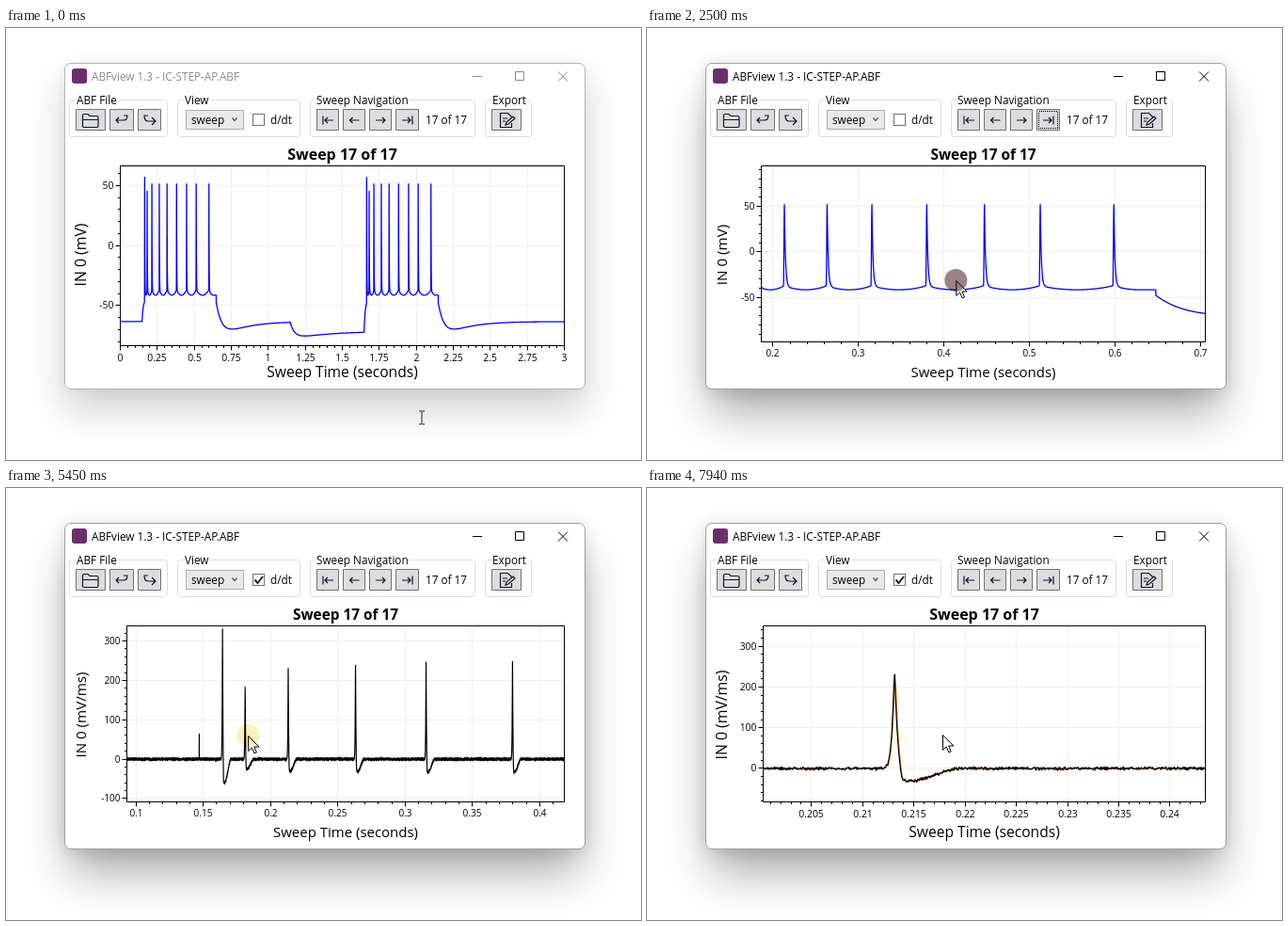
These frames come from a looping animation (675 by 459 pixels, 8 s). An HTML page with a canvas:

```html
<!DOCTYPE html>
<html lang="en">
<head>
<meta charset="utf-8">
<title>ABFview</title>
<style>
html, body { margin: 0; width: 675px; height: 459px; overflow: hidden; background: #fff; }
body { position: relative; }
body > * { position: absolute; left: 0; top: 0; }
#window {
  left: 62px; top: 37px; width: 552px; height: 345px; border-radius: 7px;
  background: #fff; border: 1px solid #b4b4b4;
  box-shadow: 0 21px 40px rgba(0,0,0,.19), 0 1px 10px rgba(0,0,0,.05);
}
.active #window {
  border-color: #a0a0a0;
  box-shadow: 0 30px 48px -6px rgba(0,0,0,.34), 0 2px 18px rgba(0,0,0,.12);
}
#chrome { font: 11.75px "Open Sans", "Noto Sans", sans-serif; fill: #000; }
.bar { fill: #8c8c8c; }
.controls { fill: none; stroke: #8a8a8a; }
.active .bar { fill: #000; }
.active .controls { stroke: #000; }
.group { fill: none; stroke: #d5dfe5; }
.legend { stroke: #fff; stroke-width: 5px; paint-order: stroke; }
.button { fill: #ddd; stroke: #707070; }
.icon { fill: none; stroke: #101430; stroke-width: 1.2; }
#focus { fill: none; stroke: #000; stroke-dasharray: 1 1; shape-rendering: crispEdges; visibility: hidden; }
.active #focus { visibility: visible; }
.derivative #focus { visibility: hidden; }
#check { visibility: hidden; fill: none; stroke: #212121; stroke-width: 2; }
.derivative #check { visibility: visible; }
#pointer { overflow: visible; width: 1px; height: 1px; }
#dot { width: 24px; height: 24px; margin: -12px; border-radius: 50%; mix-blend-mode: multiply; }
</style>
</head>
<body>
<div id="window"></div>
<svg id="chrome" width="675" height="459">
  <rect x="70" y="43" width="16" height="16" rx="3" fill="#6b2f6e"/>
  <text class="bar" x="91" y="56">ABFview 1.3 - IC-STEP-AP.ABF</text>
  <path class="controls" d="M496 51.5h10M541.5 46.5h9v9h-9zM587 46.5l10 10m0-10l-10 10"/>

  <g class="group">
    <rect x="67.5" y="76.5" width="104" height="39" rx="3"/>
    <rect x="182.5" y="76.5" width="130" height="39" rx="3"/>
    <rect x="323.5" y="76.5" width="175" height="39" rx="3"/>
    <rect x="509.5" y="76.5" width="49" height="39" rx="3"/>
  </g>
  <g class="legend">
    <text x="75" y="81">ABF File</text>
    <text x="190" y="81">View</text>
    <text x="330" y="81">Sweep Navigation</text>
    <text x="517" y="81">Export</text>
  </g>

  <path class="button" d="M74.5 86.5h31v22h-31zM110.5 86.5h25v22h-25zM140.5 86.5h24v22h-24z
    M330.5 86.5h23v22h-23zM358.5 86.5h23v22h-23zM386.5 86.5h23v22h-23zM414.5 86.5h24v22h-24z
    M516.5 86.5h31v22h-31z"/>
  <rect id="focus" x="416.5" y="88.5" width="20" height="18"/>
  <g class="icon">
    <path d="M81.5 105V93q0-1.500 1.500-1.500h4l2 2h7.500q1.500 0 1.500 1.500v9q0 1.500-1.500 1.500H83q-1.500 0-1.500-1.500M82 97.500h15.500"/>
    <path d="M120 95l-3 3 3 3M117 98h8q4 0 4-5h-4"/>
    <path d="M155 95l4 4-4 4M159 99h-8q-4 0-4-6h4"/>
    <path d="M337 93.500v9M348 98h-9m3-3l-3 3 3 3"/>
    <path d="M375.500 98h-10m3-3l-3 3 3 3"/>
    <path d="M393 98h10m-3-3l3 3-3 3"/>
    <path d="M432 93.500v9M421 98h9m-3-3l3 3-3 3"/>
    <path d="M537.500 101v4.500h-12v-15h8l4 4M528 96h5M528 99h3M531 103l1-3 7-6 2 2-7 6z"/>
  </g>

  <rect x="191.5" y="87.5" width="61" height="20" fill="#e9e9e9" stroke="#acacac"/>
  <text x="197" y="102">sweep</text>
  <path d="M240.500 95.500l2.500 3 2.500-3" fill="none" stroke="#555" stroke-width="1.2"/>
  <rect x="262.5" y="91.5" width="12" height="12" fill="#fff" stroke="#707070"/>
  <path id="check" d="M264.500 97.500l3 3.500 5.500-7"/>
  <text x="281" y="102">d/dt</text>
  <text x="446" y="102">17 of 17</text>
</svg>
<canvas id="plot" width="675" height="459"></canvas>
<svg id="pointer">
  <path id="arrow" d="M.5.5V16.500l3.700-3.600 2.600 6 2.400-1-2.600-5.900h5.200z" fill="#fff" stroke="#000"/>
  <path id="beam" d="M-3-7h2.500l.5.500.5-.5H3M0-6.500v13M-3 7h2.500l.5-.5.500.5H3" fill="none" stroke="#222"/>
</svg>
<div id="dot"></div>

<script>
const LOOP = 8000, TRAVEL = 400, ACTIVATE = 470;
const TOP = 146.5, RIGHT = 593.5, MIDDLE = 240, WIDTH = 472, HEIGHT = 187;
const RATE = 20000, COUNT = 3 * RATE + 1;
const FONT = '"Open Sans", "Noto Sans", sans-serif';
const $ = id => document.getElementById(id);
const ctx = $('plot').getContext('2d');

const gesture = (start, end, action, x, y, dx = 0, dy = 0) =>
  ({ start, end, action, x, y, dx, dy });

// The pointer travels between gestures; pan and zoom alone move the axes.
const gestures = [
  gesture(470, 850, 'pan', 200, 232, 165.8, 6.2),
  gesture(950, 1400, 'zoom', 332, 241, 252.3, 25.2),
  gesture(1810, 2090, 'zoom', 258, 266, 331.3),
  gesture(2490, 2850, 'zoom', 328, 268, 121.4),
  gesture(3320, 3330, 'hover', 407, 114),
  gesture(3660, 3870, 'check', 274, 98),
  gesture(4540, 4930, 'pan', 246, 242, 276.5, -6.5),
  gesture(5440, 5700, 'pan', 257, 263, 32.2, 7),
  gesture(5800, 5990, 'zoom', 290, 268, 298, 7.2),
  gesture(6250, 6610, 'zoom', 319, 275, 182),
  gesture(6900, 7100, 'zoom', 300, 264, 126.5, -10.3),
  gesture(7400, 7870, 'pan', 263, 261, 129.2, 1),
  gesture(7930, LOOP, 'hover', 314, 262)
];
const dotColor = { pan: '#ffeeb8', check: '#ffeeb8', zoom: '#9c8383' };

function smooth(a, b, v) {
  const k = Math.min(1, Math.max(0, (v - a) / (b - a)));
  return k * k * (3 - 2 * k);
}

const mix = (a, b, k) => a + (b - a) * k;
const zoomFactor = (d, size) => Math.pow(10, d / (Math.abs(d) + size));

const actions = {
  hover() {},
  pan(view, dx, dy) {
    view.center -= dx / WIDTH * view.span;
    view.zero += dy;
  },
  zoom(view, dx, dy) {
    const fy = zoomFactor(-dy, HEIGHT);
    view.span /= zoomFactor(dx, WIDTH);
    view.unit *= fy;
    view.zero = MIDDLE + (view.zero - MIDDLE) * fy;
  },
  check(view, dx, dy, done) {
    if (done) Object.assign(view, { derivative: true, zero: 294.5, unit: .418 });
  }
};

function poseAt(t) {
  const view = { center: 1.5, span: 3, zero: 231, unit: 1.275, derivative: false };
  let x = 442, y = 414, free = 70;
  for (const g of gestures) {
    if (t < g.start) {
      const k = smooth(free, Math.min(g.start, free + TRAVEL), t);
      return { view, x: mix(x, g.x, k), y: mix(y, g.y, k) };
    }
    const k = smooth(g.start, g.end, t), dx = g.dx * k, dy = g.dy * k;
    actions[g.action](view, dx, dy, t >= g.end);
    x = g.x + dx;
    y = g.y + dy;
    free = g.end;
    if (t < g.end) return { view, x, y, action: g.action };
  }
  return { view, x, y };
}

const spikes = [.1643, .1811, .2131, .2631, .3155, .3797, .4472, .5125, .5986];
const peakVoltage = i => i > 1 ? 52 : 58 - 12 * i;
const peakSlope = i => i > 1 ? 231 + 17 * Math.abs(Math.sin((i - 2) * Math.PI / 5)) : 330 - 144 * i;

const decay = u => -63.5 + 33.5 * Math.exp(-u / .04) - 17.5 * Math.exp(-u / .15);
const hyper = u => -71.5 + 14.5 * Math.exp(-u / .03) - 6.7 * Math.exp(-u / .25);

function plateau(u, from) {
  const i = spikes.findLastIndex(s => s <= u);
  if (i < 0) return mix(from, -45, 1 - Math.exp((.147 - u) / .008));
  const since = u - spikes[i], gap = spikes[i + 1] - spikes[i];
  const w = gap ? since / gap : Math.min(.5, since / .06);
  return -36.5 - 5 * Math.pow(Math.max(0, Math.sin(Math.PI * w)), .7);
}

function membrane(t) {
  const second = t >= 1.5, u = second ? t - 1.5 : t;
  if (u < .147) return second ? hyper(t - 1.147) : -63.4;
  if (u < .648) return plateau(u, second ? -72 : -63);
  return second || t < 1.147 ? decay(u - .648) : hyper(t - 1.147);
}

const spikeShape = ms => ms < .35 ? smooth(-.8, .35, ms) : Math.exp((.35 - ms) / 1.2);

function slopeShape(ms, peak) {
  const depth = peak / (peak > 300 ? 5.5 : 7.5);
  return peak * Math.exp(-Math.pow(Math.abs(ms) / .28, 1.3))
    - depth * smooth(.35, .8, ms) * (1 - smooth(1.5, 6.5, ms));
}

const voltage = new Float32Array(COUNT), slope = new Float32Array(COUNT);
let seed = 7;
const random = () => (seed = (seed * 16807) % 2147483647) / 2147483647;

for (let i = 0; i < COUNT; i++) {
  voltage[i] = membrane(i / RATE);
  slope[i] = (random() + random() + random() - 1.5) * 3.6;
}
for (const offset of [0, 1.5]) {
  slope[Math.round((offset + .147) * RATE)] += 65;
  spikes.forEach((s, i) => {
    const mid = Math.round((s + offset) * RATE);
    for (let j = -30; j < 150; j++) {
      const ms = j / RATE * 1000;
      voltage[mid + j] += (peakVoltage(i) + 36.5) * spikeShape(ms);
      slope[mid + j] += slopeShape(ms, peakSlope(i));
    }
  });
}

function trace(data, axes, color, width, shift = 0) {
  const first = Math.max(0, Math.floor(axes.xMin * RATE) - 1);
  const last = Math.min(COUNT - 1, Math.ceil(axes.xMax * RATE) + 1);
  const stride = Math.max(1, Math.floor((last - first) / 30000));
  ctx.beginPath();
  for (let i = first - first % stride; i <= last; i += stride)
    ctx.lineTo(axes.px(i / RATE) + shift, axes.py(data[i]));
  ctx.strokeStyle = color;
  ctx.lineWidth = width;
  ctx.stroke();
}

function ticks(min, max, step, draw) {
  const minor = step / 5;
  for (let i = Math.ceil(min / minor); i * minor <= max; i++)
    draw(i * minor, i % 5 === 0);
}

function line(x1, y1, x2, y2, color) {
  ctx.strokeStyle = color;
  ctx.beginPath();
  ctx.moveTo(x1, y1);
  ctx.lineTo(x2, y2);
  ctx.stroke();
}

function text(str, x, y, size, align = 'center', weight = '') {
  ctx.font = `${weight} ${size}px ${FONT}`;
  ctx.textAlign = align;
  ctx.fillText(str, x, y);
}

// Smallest step of the form 1, 2.5 or 5 times a power of ten that leaves room.
function xStep(scale) {
  const room = scale < 200 ? 38 : 52;
  for (let power = .001; ; power *= 10)
    for (const m of [1, 2.5, 5])
      if (m * power * scale >= room) return m * power;
}

const snap = v => Math.round(v - .5) + .5;

function drawPlot(view, dragging, bottom) {
  const { center, span, zero, unit, derivative } = view;
  const yMin = (zero - bottom) / unit, yMax = (zero - TOP) / unit;
  const left = !derivative ? 121.5 : yMin <= -100 ? 128.5 : 123.5;
  const mid = (left + RIGHT) / 2, scale = (RIGHT - left) / span;
  const axes = {
    xMin: center - span / 2,
    xMax: center + span / 2,
    px: x => mid + (x - center) * scale,
    py: y => zero - y * unit
  };
  const fit = dragging ? .96 : 1, edge = 1 / scale;

  ctx.clearRect(0, 0, 675, 459);
  ctx.lineWidth = 1;
  ctx.lineJoin = 'round';
  ctx.textBaseline = 'middle';
  ctx.fillStyle = '#000';

  ticks(axes.xMin - edge, axes.xMax + edge, xStep(scale), (x, major) => {
    const p = snap(axes.px(x));
    line(p, bottom, p, bottom + (major ? 5 : 2.5), '#000');
    if (!major) return;
    line(p, TOP, p, bottom, '#efefef');
    text(String(+x.toFixed(4)), p, bottom + 13.3, 10.4 * fit);
  });
  ticks(yMin, yMax, derivative ? 100 : 50, (y, major) => {
    const p = snap(axes.py(y));
    line(left, p, left - (major ? 5 : 2.5), p, '#000');
    if (!major) return;
    line(left, p, RIGHT, p, '#efefef');
    text(String(Math.round(y)), left - 7, p + .5, 10.4 * fit, 'right');
  });

  ctx.save();
  ctx.beginPath();
  ctx.rect(left, TOP, RIGHT - left, bottom - TOP);
  ctx.clip();
  if (derivative) {
    if (!dragging) trace(slope, axes, '#d98324', 1.3, .7);
    trace(slope, axes, '#000', 1.2);
  } else {
    trace(voltage, axes, '#00f', 1.3);
  }
  ctx.restore();

  ctx.lineWidth = 1;
  ctx.strokeStyle = '#000';
  ctx.strokeRect(left, TOP, RIGHT - left, bottom - TOP);
  text('Sweep 17 of 17', mid, 135.5, 16 * fit, 'center', 'bold');
  text('Sweep Time (seconds)', mid, 367, 15.6 * fit);
  ctx.save();
  ctx.translate(81, 241);
  ctx.rotate(-Math.PI / 2);
  text(derivative ? 'IN 0 (mV/ms)' : 'IN 0 (mV)', 0, 0, 15.8 * fit);
  ctx.restore();
}

function frame() {
  const t = performance.now() % LOOP;
  const { view, x, y, action } = poseAt(t);
  const active = t >= ACTIVATE, outside = y > 383;

  document.body.classList.toggle('active', active);
  document.body.classList.toggle('derivative', view.derivative);
  drawPlot(view, action === 'pan' || action === 'zoom', active ? 333.5 : 337.5);

  const place = `translate(${x}px, ${y}px)`;
  $('pointer').style.transform = place;
  $('dot').style.transform = place;
  $('dot').style.background = dotColor[action] || 'none';
  $('beam').style.display = outside ? '' : 'none';
  $('arrow').style.display = outside ? 'none' : '';
  requestAnimationFrame(frame);
}
frame();
</script>
</body>
</html>
```
